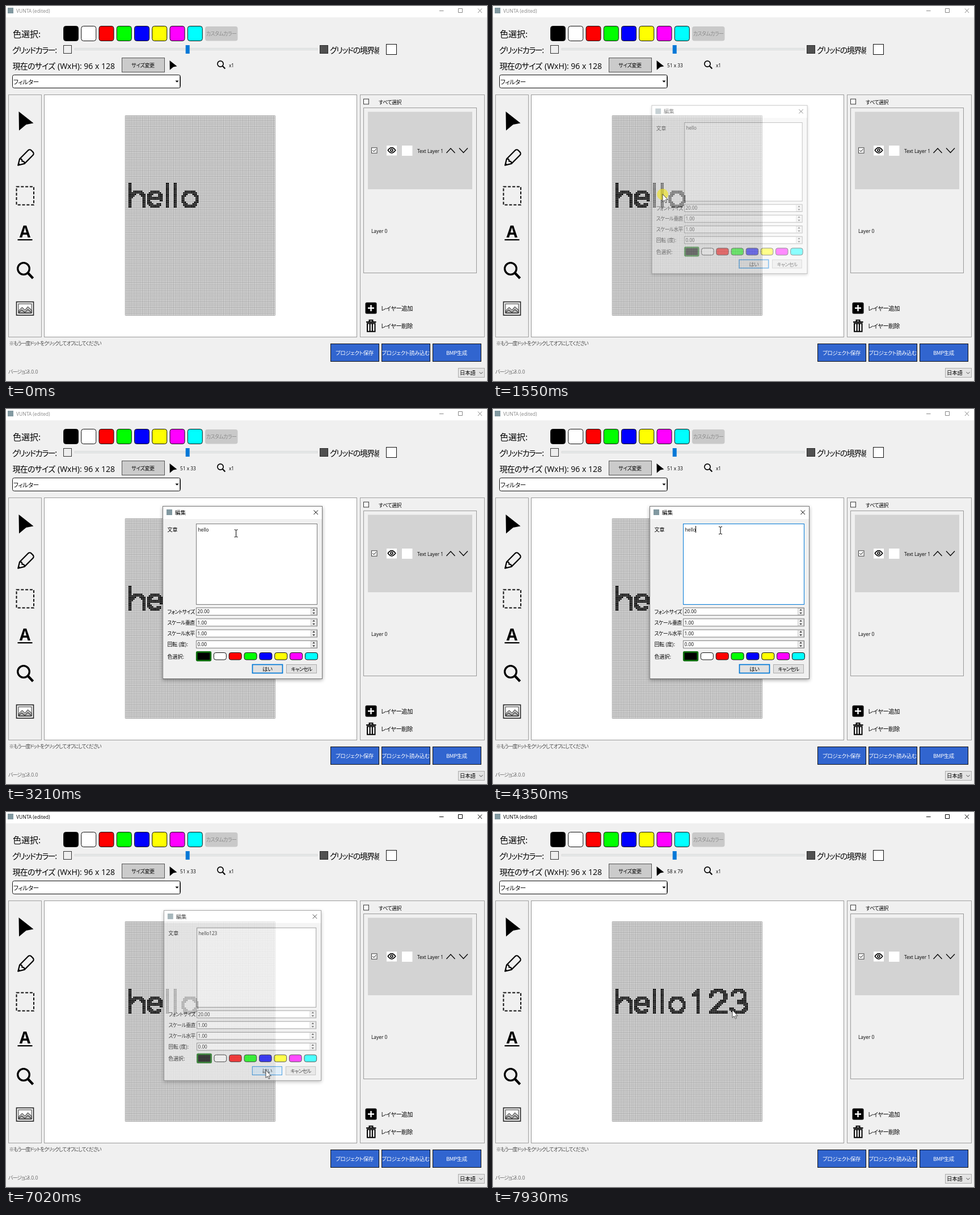
Recreate the animation shown at these times as an HTML page. Size 848 by 661 pixels, loop 8 s.

```html
<!DOCTYPE html>
<html lang="ja">
<head>
<meta charset="utf-8">
<title>Dot editor</title>
<style>
html,body{margin:0;width:100%;height:100%;overflow:hidden;background:#f0f0f0}
svg{display:block;width:848px;height:661px}
text{font-family:"Noto Sans CJK JP","Noto Sans CJK",sans-serif;font-feature-settings:"palt";white-space:pre}
.en{font-family:"Open Sans","Noto Sans",sans-serif}
.line{fill:none;stroke:#000}
#dialog{transform-origin:417px 323.5px}
#frame{filter:drop-shadow(0 2px 3px rgba(0,0,0,.35))}
</style>
</head>
<body>
<svg id="stage" viewBox="0 0 848 661"></svg>
<script>
const LOOP = 8000, CELL = 2.75, GX = 210.3, GY = 193.3;
const COLORS = ['#000', '#fff', '#f00', '#0f0', '#00f', '#ff0', '#f0f', '#0ff'];
const $ = id => document.getElementById(id);

// Markup helpers
const rect = (x, y, w, h, fill, stroke = 'none', rx = 0, more = '') =>
  `<rect x="${x}" y="${y}" width="${w}" height="${h}" rx="${rx}" fill="${fill}" stroke="${stroke}" ${more}/>`;
const path = (d, more = '') => `<path d="${d}" ${more}/>`;
const line = (d, width = 1, more = '') => path(d, `class="line" stroke-width="${width}" ${more}`);
const jp = (x, y, size, s, tight = 0, more = '') =>
  `<text x="${x}" y="${y}" font-size="${size}" letter-spacing="${-tight}" ${more}>${s}</text>`;
const en = (x, y, size, s, more = '') =>
  `<text class="en" x="${x}" y="${y}" font-size="${size}" ${more}>${s}</text>`;
const mid = 'text-anchor="middle"';
const lens = (x, y, k) => `<g transform="translate(${x} ${y}) scale(${k})">` +
  `<circle r="10.3" class="line" stroke-width="3.3"/>` + line('M7.6 7.6L16.6 17', 4.4) + '</g>';
const arrowIcon = (x, y, k) =>
  path('M0 0L26 20.5L13 23L.5 33.5Z', `transform="translate(${x} ${y}) scale(${k})"`);

// Dot lettering: strokes are [x1,y1,x2,y2] lines or [cx,cy,rx,ry,from,to] arcs, drawn with a 2x2 pen
const HELLO = [
  [2, 43, 2, 57], [7, 52, 4, 4, 200, 360], [11, 52, 11, 57],
  [18, 52.5, 4.3, 4.7, 0, -320], [14, 52, 22, 52],
  [26, 43, 26, 57], [31, 43, 31, 57],
  [40.5, 52.5, 4.6, 4.7, 0, 360]
];
const DIGITS = [
  [51, 46, 54, 43], [54, 43, 54, 57],
  [67, 47, 4.6, 4, 180, 395], [70.8, 49.3, 62, 57], [62, 57, 72, 57],
  [80, 46.8, 4.4, 3.8, 190, 450], [80, 53.6, 5, 3.5, -90, 165]
];
function dots(strokes) {
  const cells = new Set();
  for (const [a, b, c, d, from, to] of strokes)
    for (let i = 0; i <= 60; i++) {
      const k = i / 60, angle = (from + (to - from) * k) * Math.PI / 180;
      const x = Math.round(from === undefined ? a + (c - a) * k : a + c * Math.cos(angle));
      const y = Math.round(from === undefined ? b + (d - b) * k : b + d * Math.sin(angle));
      for (const n of [0, 1]) for (const m of [0, 1]) cells.add((x + n) + ',' + (y + m));
    }
  return [...cells].map(key => {
    const [x, y] = key.split(',');
    return `M${GX + x * CELL + .2} ${GY + y * CELL + .2}h2.35v2.35h-2.35z`;
  }).join('');
}

function grid() {
  let d = '';
  for (let i = 0; i <= 96; i++) d += `M${GX + i * CELL} ${GY}v352`;
  for (let i = 0; i <= 128; i++) d += `M${GX} ${GY + i * CELL}h264`;
  return rect(GX, GY, 264, 352, '#fff') + line(d, .75, 'style="stroke:#808080"') +
    path(dots(HELLO)) + path(dots(DIGITS), 'id="digits"');
}

const titleBar = () => rect(0, 0, 848, 20, '#fff') + rect(3, 3, 10, 10, '#8299a1') +
  `<g id="caption" fill="#888" stroke="#888">` +
  en(18, 12, 8.5, 'VUNTA (edited)', 'stroke="none"') +
  path('M764 8.5h7.5M797.5 4.5h7v7h-7zM832 4.5l7 7.5M839 4.5l-7 7.5', 'fill="none"') + '</g>';

const topBar = () =>
  jp(12, 54.5, 15, '色選択:') +
  COLORS.map((c, i) => rect(101.5 + 31.25 * i, 35.5, 26, 26, c, '#111', 4)).join('') +
  rect(351, 36, 57.5, 25.5, '#c9c9c9', 'none', 4) +
  jp(379.5, 52, 9, 'カスタムカラー', .6, mid + ' fill="#8c8c8c"') +
  jp(11, 82.5, 14, 'グリッドカラー:', 1.4) +
  rect(101.5, 69.5, 14, 14, '#eee', '#333') +
  rect(121, 74.5, 428, 3, '#e7eaea', '#d9d9d9') + rect(316.7, 69, 7, 15, '#0078d7') +
  rect(553.5, 69.5, 14, 14, '#505050', '#2a2a2a') +
  `<clipPath id="cut"><path d="M560 60h98v40h-98z"/></clipPath>` +
  jp(571, 82.5, 14, 'グリッドの境界線', 1.4, 'clip-path="url(#cut)"') +
  rect(670.5, 67.5, 18, 18, '#fff', '#111') +
  jp(11.5, 110.5, 14, '現在のサイズ', .8) + en(91, 110.5, 14, '(WxH): 96 x 128') +
  rect(204.5, 91.5, 75, 25, '#cbcbcb', '#555') + jp(241.5, 108, 9, 'サイズ変更', .4, mid) +
  arrowIcon(288.5, 96, .5) + en(307, 107.5, 8.3, '', 'id="coords"') +
  lens(378, 102, .5) + en(393, 107.5, 8.3, 'x1') +
  rect(11.5, 121.5, 296, 23, '#fff', '#111', 3) + jp(13, 137.5, 10.5, 'フィルター', .2) +
  line('M306.5 123v20', 1, 'style="stroke:#555"') + path('M298.5 131.5h6l-3 3.2z');

const tools = () =>
  rect(4.5, 156.5, 58, 427, '#f0f0f0', '#a0a0a0') +
  arrowIcon(22.5, 186, 1) +
  `<g transform="translate(34 268) rotate(45)">` +
  line('M-6 8V-13a4 4 0 0 1 4-4h4a4 4 0 0 1 4 4V8L0 18ZM-6 8Q-3 4.5 0 8Q3 4.5 6 8', 2.2, 'stroke-linejoin="round"') +
  path('M-2.3 14.2h4.6L0 18.5z') + '</g>' +
  rect(18.5, 318.5, 30.5, 32, 'none', '#111', 0, 'stroke-width="2" stroke-dasharray="5 2.8"') +
  en(33.5, 408, 28, 'A', mid + ' font-weight="700"') + rect(20.5, 411, 26, 2.2, '#000') +
  lens(31, 463, 1) +
  rect(18.5, 521.5, 30, 23.5, '#f4f4f4', '#222', 0, 'stroke-width="1.6"') +
  rect(22, 525, 23, 16.5, '#fff', '#333') +
  path('M22.5 537l6-6 5 5 5-6 6.5 6v5h-22.5z', 'fill="#bbb" stroke="#222"') +
  line('M22.5 540l5-4 6 4 5-5 6 5', 1);

const layers = () =>
  rect(624.5, 156.5, 219, 427, '#f0f0f0', '#a0a0a0') +
  rect(630.5, 164, 9, 9, '#fff', '#333') + jp(657, 172.5, 9, 'すべて選択', .5) +
  rect(630.5, 179.5, 199, 291, '#f0f0f0', '#999') + rect(638, 186.5, 184, 136.5, '#d3d3d3') +
  rect(644.5, 249.8, 9.5, 9.5, '#fff', '#444') + line('M646.3 254.3l2.2 2.3 3.8-4.3') +
  rect(671, 246, 18, 17.5, '#fff') + rect(698, 246, 18.5, 18, '#fff') +
  line('M673.3 254.3Q680 245 686.7 254.3Q680 263.6 673.3 254.3Z', 1.6) +
  `<circle cx="680" cy="254.3" r="2" class="line" stroke-width="1.6"/>` +
  en(725, 258.5, 8.3, 'Text Layer 1') +
  line('M776.5 259l7.5-8 7.5 8M799 250.5l7.5 8 7.5-8', 1.3) +
  en(644, 399.5, 8.4, 'Layer 0') +
  rect(633.5, 522.5, 20, 20, '#000', 'none', 2.5) +
  line('M638 532.5h11M643.5 527v11', 2.4, 'style="stroke:#fff"') + jp(661, 537, 10.5, 'レイヤー追加', .6) +
  line('M635 557h17.5M640.5 556v-2.2h6v2.2', 2) + line('M637 559.5h13.5v14.3h-13.5zM641.6 560v13M645.9 560v13', 2) +
  jp(661, 568, 10.5, 'レイヤー削除', .6);

const bottom = () =>
  jp(5.5, 598, 8.6, '※もう一度ドットをクリックしてオフにしてください', .8, 'fill="#444"') +
  [['プロジェクト保存', 572.5], ['プロジェクト読み込む', 662.5], ['BMP生成', 752.5]].map(([s, x]) =>
    rect(x, 595.5, 85, 31, '#3165cf', '#111') + jp(x + 42, 614.8, 9.5, s, .4, mid + ' fill="#fff"')).join('') +
  jp(4, 648, 9, 'バージョン', 1, 'fill="#666"') + en(37, 648, 8.6, '3.0.0', 'fill="#666"') +
  rect(797.5, 638.5, 46, 16, '#e4e4e4', '#adadad') + jp(800, 650, 9.3, '日本語') +
  line('M834.5 645.2l3 3 3-3', 1, 'style="stroke:#444"');

const SPINS = [['フォントサイズ', '20.00', .85], ['スケール垂直', '1.00', .6], ['スケール水平', '1.00', .6], ['回転 (度):', '0.00', .2]];
const spinTop = i => 350.5 + 19.3 * i;
const spin = ([label, value, tight], i) => {
  const y = spinTop(i);
  return jp(284.5, y + 10, 9, label, tight) +
    rect(335.5, y, 213, 13, '#fff', '#7a7a7a', 0, `id="spin${i}"`) +
    en(337.5, y + 9.8, 8.3, value) + rect(537.5, y + 1, 10, 11, '#ececec', '#c4c4c4', 0, 'stroke-width=".8"') +
    path(`M540.3 ${y + 4.8}h4.6l-2.3-2.6zM540.3 ${y + 8.2}h4.6l-2.3 2.6z`, 'fill="#333"');
};
const dialog = () => `<g id="dialog">` +
  rect(276.5, 171.5, 281, 304, '#f0f0f0', '#777', 0, 'id="frame"') + rect(277, 172, 280, 22, '#fff') +
  rect(283, 177, 10, 10, '#8299a1') + jp(298, 186, 9.5, '編集') +
  line('M542.5 178.5l7.5 7.5M550 178.5l-7.5 7.5') + jp(284.5, 216, 9, '文章') +
  rect(335.5, 202.5, 213, 142, '#fff', '#7a7a7a', 0, 'id="field"') +
  en(338.5, 215.5, 8.3, 'hello', 'id="typed"') + rect(358, 206, 1, 12, '#000', 'none', 0, 'id="caret"') +
  SPINS.map(spin).join('') + jp(284.5, 440, 9, '色選択:') +
  COLORS.map((c, i) => i
    ? rect(339.5 + 26.85 * i, 429.5, 22, 12.5, c, '#111', 3.5)
    : rect(336.3, 428.3, 24.5, 15, c, '#0b6e0b', 1, 'stroke-width="2.8"')).join('') +
  rect(434.5, 450.5, 53, 15, '#e1e1e1', '#0078d7', 0, 'id="yes"') + jp(461, 462, 9.3, 'はい', .3, mid) +
  rect(494.5, 450.5, 53, 15, '#e1e1e1', '#adadad') + jp(521, 462, 9, 'キャンセル', .8, mid) + '</g>';

const pointer = () =>
  `<circle id="click" cx="299" cy="332" r="10" fill="#f2e51c" opacity=".62"/><g id="pointer">` +
  path('M0 0V13.5L3.1 10.8L5.2 15.4L7.2 14.5L5.2 10.1H9.3Z', 'id="arrow" fill="#fff" stroke="#222" stroke-width=".8"') +
  line('M-3-6.5Q0-6.5 0-5.5Q0-6.5 3-6.5M0-6V6M-3 6.5Q0 6.5 0 5.5Q0 6.5 3 6.5', 1, 'id="beam"') + '</g>';

$('stage').innerHTML = rect(0, 0, 848, 661, '#f0f0f0') + titleBar() + topBar() + tools() +
  rect(67.5, 156.5, 551, 427, '#fff', '#999') + grid() + layers() + bottom() + dialog() + pointer();

// Timeline
const TRACK = [
  [70, 838, 642], [200, 690, 530], [350, 430, 385], [490, 287, 336], [620, 299, 331.5],
  [1890, 299, 331.5], [2030, 390, 338], [2170, 492, 352], [2310, 519, 360],
  [2580, 519, 360], [2800, 478, 310], [3050, 415, 232], [3290, 401, 213], [3350, 401, 214],
  [5770, 401, 214], [5900, 415, 270], [6060, 443, 390], [6190, 454, 443], [6260, 455, 449],
  [6330, 456, 451], [6540, 458, 455], [7150, 458, 455], [7350, 455, 425], [7650, 441, 357],
  [7790, 441, 357], [7860, 426, 351], [7925, 426, 351], [7930, 422, 349], [LOOP, 422, 349]
];
// [time, opacity, scale]
const FADE = [
  [0, 0, 1], [1420, .04, .95], [1490, .45, .975], [1560, .8, .99], [1620, .95, .997], [1690, 1, 1],
  [7020, .7, .986], [7090, .25, .955], [7160, 0, .93]
];
const CARET = [[0, 0], [3290, 1], [3820, 0], [4350, 1], [4890, 0], [5030, 1], [5360, 0], [5890, 1], [6420, 0]];
const TYPED = [[0, 'hello'], [5030, 'hello12'], [5160, 'hello123']];

const held = (table, t) => table.filter(row => row[0] <= t).pop();
function place(t) {
  const i = TRACK.findIndex(row => row[0] > t);
  if (i < 1) return TRACK[0].slice(1);
  const [t0, x0, y0] = TRACK[i - 1], [t1, x1, y1] = TRACK[i], k = (t - t0) / (t1 - t0);
  return [x0 + (x1 - x0) * k, y0 + (y1 - y0) * k];
}
const within = (t, a, b) => t >= a && t < b;
const inside = (x, y, left, top, w, h) => x > left && x < left + w && y > top && y < top + h;
const show = (id, on) => $(id).setAttribute('visibility', on ? 'visible' : 'hidden');
const set = (id, attrs) => { for (const k in attrs) $(id).setAttribute(k, attrs[k]); };

function readout(t) {
  if (t < 70) return '';
  const [x, y] = place(t < 1290 ? t : t < 7790 ? 1290 : t - 75);
  if (!inside(x, y, GX, GY, 264, 352)) return '';
  return `${Math.floor((y - GY) / CELL) + 1} x ${Math.floor((x - GX) / CELL) + 1}`;
}

function draw(t) {
  const [x, y] = place(t), open = within(t, 1690, 7020);
  const tone = within(t, 1290, 1420) || t >= 7020 ? '#000' : '#888';
  set('caption', { fill: tone, stroke: tone });
  $('coords').textContent = readout(t);
  show('digits', t >= 7160);

  const [, alpha, scale] = held(FADE, t);
  $('dialog').style.opacity = alpha;
  $('dialog').style.transform = `scale(${scale})`;
  const focus = within(t, 3290, 6610);
  set('field', { stroke: focus ? '#0078d7' : '#7a7a7a' });
  $('typed').textContent = held(TYPED, t)[1];
  set('caret', { x: Math.round(338.5 + $('typed').getComputedTextLength()) });
  show('caret', focus && held(CARET, t)[1]);

  let beam = open && inside(x, y, 335, 202, 214, 143);
  SPINS.forEach((_, i) => {
    const hover = open && inside(x, y, 335, spinTop(i), 214, 14);
    set('spin' + i, { stroke: hover ? '#171717' : '#7a7a7a' });
    beam = beam || hover && x < 537;
  });
  const pressed = within(t, 6610, 6680), hot = within(t, 6330, 7160);
  set('yes', {
    fill: pressed ? '#cce4f7' : hot ? '#d5e9f8' : '#e1e1e1',
    stroke: pressed ? '#005499' : '#0078d7',
    'stroke-width': hot ? 1 : 1.7
  });

  show('click', within(t, 1290, 1620));
  set('pointer', { transform: `translate(${x} ${y})` });
  show('arrow', t >= 70 && !beam);
  show('beam', beam);
}

const start = performance.now();
function tick() {
  draw((performance.now() - start) % LOOP);
  requestAnimationFrame(tick);
}
tick();
</script>
</body>
</html>
```
